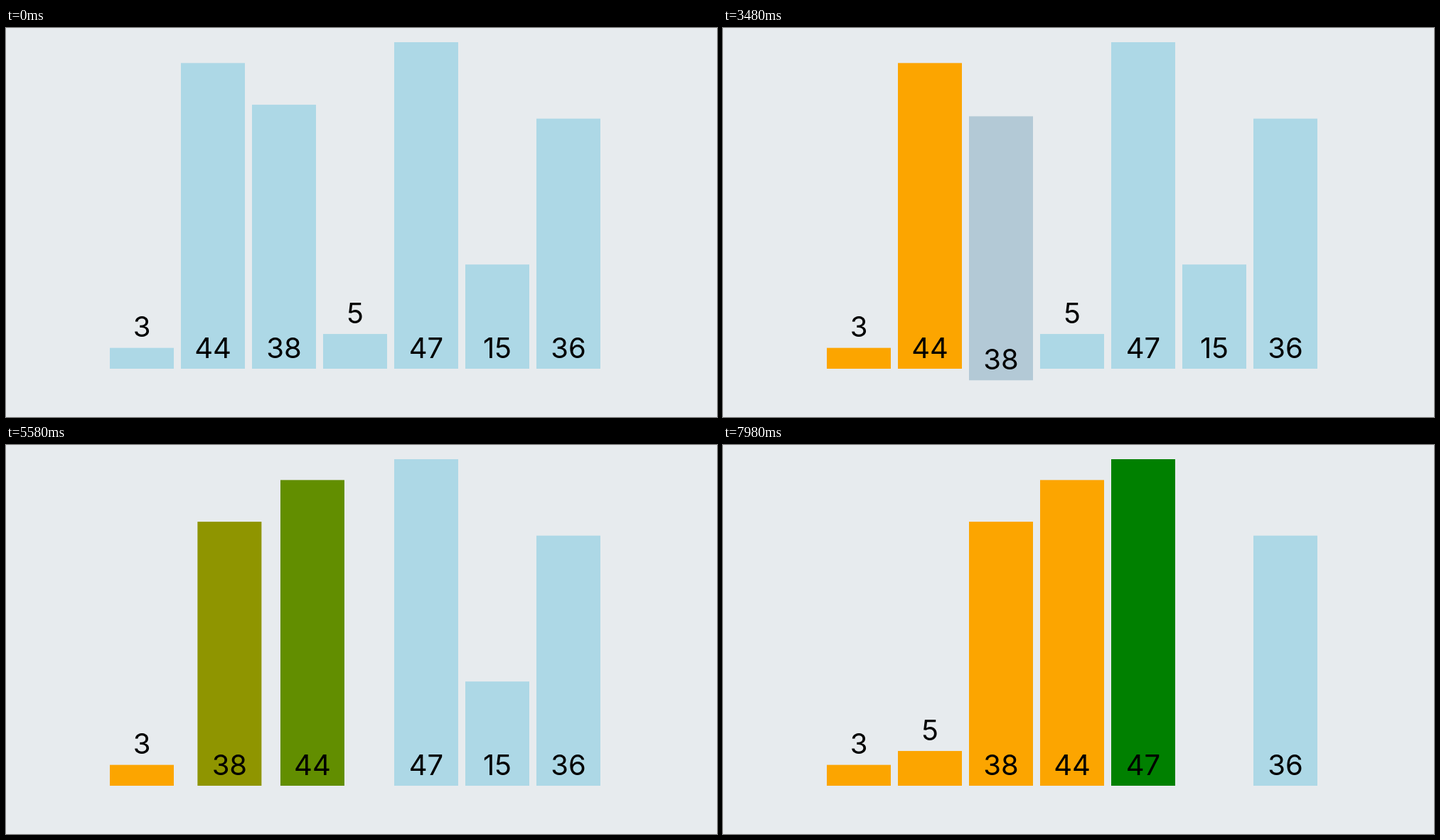
Recreate the animation shown at these times as an HTML page. Size 1000 px wide and 548 px high, loop 8 s.

```html
<!DOCTYPE html>
<html lang="en">
<head>
<meta charset="utf-8">
<title>Insertion sort</title>
<style>
  html, body { margin: 0; width: 100%; height: 100%; overflow: hidden; background: #e7ebee; }
  svg { display: block; width: 1000px; height: 548px; }
  text { font: 40px Inter, "Liberation Sans", sans-serif; text-anchor: middle; fill: #000; }
</style>
</head>
<body>
<svg id="stage" viewBox="0 0 1000 548"></svg>
<script>
const LOOP = 8000, STEP = 60, MOVE = 250;
const BASE = 480, DROP = 480, SCALE = 460 / 47;
const BLUE = [173, 216, 230], RED = [255, 0, 0], GREEN = [0, 128, 0], ORANGE = [252, 165, 0];

// Each track is a list of [start time, new value]; every change takes MOVE ms.
const bars = [
  { value: 3, color: [[1950, ORANGE], [2680, GREEN], [2940, ORANGE], [4163, GREEN], [4415, ORANGE],
                      [6060, GREEN], [6436, ORANGE]] },
  { value: 44, slot: [[3810, 2], [5464, 3]], drop: [[2427, 1], [2940, 0]],
    color: [[2412, RED], [2680, GREEN], [2925, ORANGE], [3790, GREEN], [4070, ORANGE],
            [5445, GREEN], [5760, ORANGE], [6800, GREEN], [7424, ORANGE]] },
  { value: 38, slot: [[3810, 1], [5483, 2]], drop: [[3429, 1], [4412, 0]],
    color: [[3415, RED], [4070, GREEN], [4380, ORANGE], [5461, GREEN], [5780, ORANGE]] },
  { value: 5, slot: [[5464, 2], [5780, 1]], drop: [[4416, 1], [6426, 0]],
    color: [[4400, RED], [6060, GREEN], [6410, ORANGE]] },
  { value: 47, drop: [[6426, 1], [7424, 0]],
    color: [[6414, RED], [6800, GREEN], [7400, ORANGE], [7690, GREEN]] },
  { value: 15, drop: [[7424, 1]], color: [[7410, RED]] },
  { value: 36 }
];

const ease = x => x < 0.5 ? 4 * x ** 3 : 1 - 4 * (1 - x) ** 3;
const mix = (a, b, p) => Array.isArray(a) ? a.map((v, i) => v + (b[i] - v) * p) : a + (b - a) * p;

function valueAt(track = [], start, time) {
  return track.reduce((v, [at, next]) =>
    time <= at ? v : mix(v, next, ease(Math.min(1, (time - at) / MOVE))), start);
}

const stage = document.getElementById("stage");
function add(parent, tag, attrs) {
  const el = document.createElementNS("http://www.w3.org/2000/svg", tag);
  for (const key in attrs) el.setAttribute(key, attrs[key]);
  return parent.appendChild(el);
}

for (const bar of bars) {
  const height = bar.value * SCALE, top = BASE - height;
  bar.group = add(stage, "g", {});
  bar.rect = add(bar.group, "rect", { y: top, width: 90, height });
  // Labels of very short bars sit above them.
  const label = add(bar.group, "text", { x: 45, y: (height < 60 ? top : BASE) - 15.5 });
  label.textContent = bar.value;
}

function draw(time) {
  bars.forEach((bar, i) => {
    const x = 146 + 100 * valueAt(bar.slot, i, time);
    const y = DROP * valueAt(bar.drop, 0, time);
    bar.group.setAttribute("transform", `translate(${x} ${y})`);
    bar.rect.setAttribute("fill", `rgb(${valueAt(bar.color, BLUE, time).map(Math.round)})`);
  });
}

const begin = performance.now();
function tick() {
  const time = (performance.now() - begin) % LOOP;
  draw(Math.floor(time / STEP) * STEP);
  requestAnimationFrame(tick);
}
tick();
</script>
</body>
</html>
```
